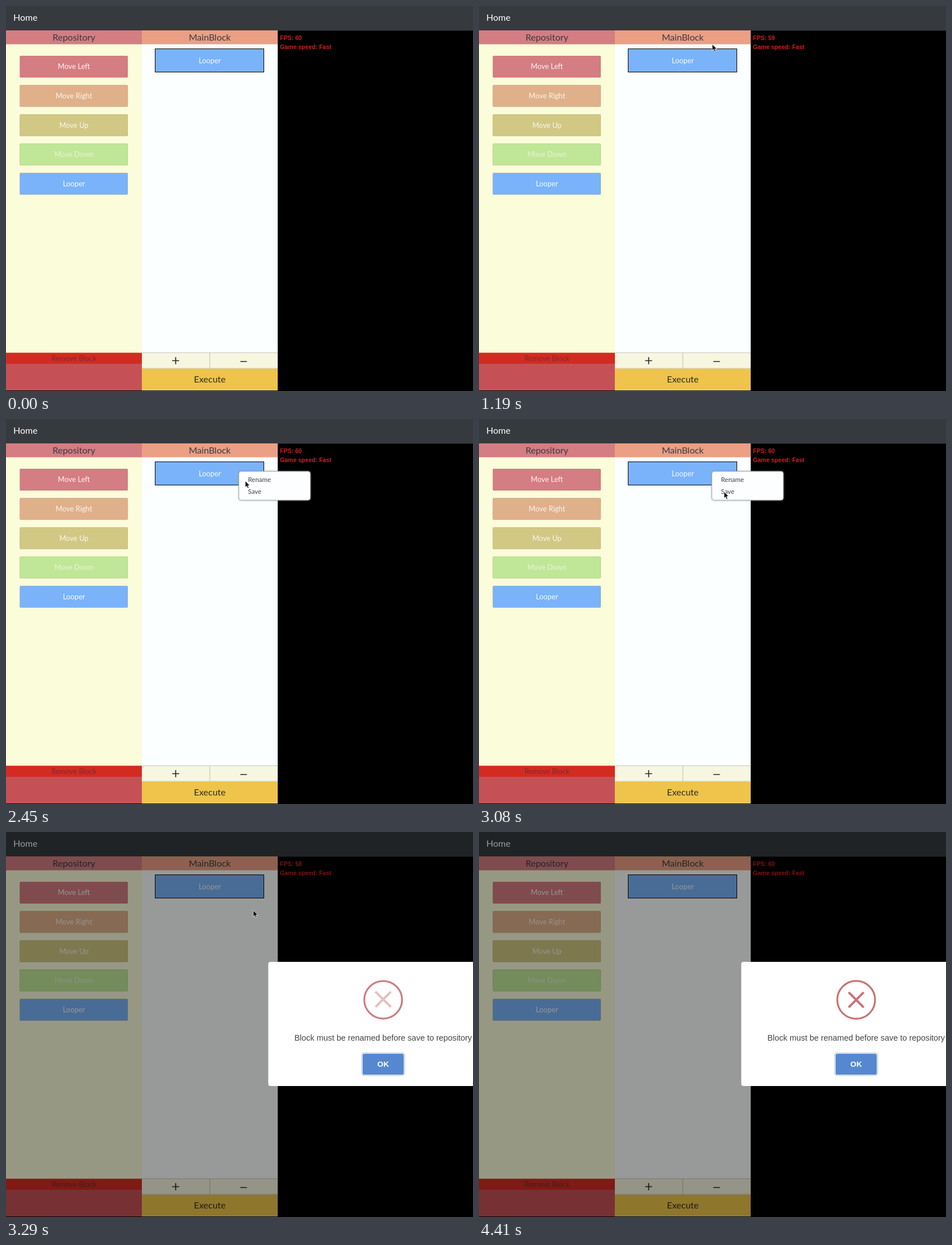
Recreate the animation shown at these times as an HTML page. Size 825x679 px, loop 4.48 s.

```html
<!DOCTYPE html>
<html lang="en">
<head>
<meta charset="utf-8">
<title>Block editor</title>
<style>
  html, body { margin: 0; width: 100%; height: 100%; overflow: hidden; background: #000; }
  svg { display: block; width: 825px; height: 679px; }
  text { font-family: Lato, sans-serif; font-size: 12.8px; }
  .mid { text-anchor: middle; }
  .head { font-size: 16px; fill: #393a42; }
  .menu text { font-size: 11.5px; fill: #3d3f44; }
  .hud { font: bold 10.55px "Liberation Sans", Arial, sans-serif; fill: #cf211d; }
  .msg { font: 14.4px "Liberation Sans", Arial, sans-serif; fill: #444; }
  .ok { font: bold 13.6px "Liberation Sans", Arial, sans-serif; fill: #fff; }
  .menu rect { filter: drop-shadow(0 0 1.5px #8c8c8c); }
</style>
</head>
<body>
<svg viewBox="0 0 825 679">
  <rect width="825" height="679"/>
  <rect width="825" height="43.5" fill="#363a3e"/>
  <text x="13" y="26.3" font-size="16" style="font-size:16px" fill="#fff">Home</text>

  <rect y="43" width="240" height="635" fill="#fbfcd9"/>
  <rect y="43" width="240" height="24.5" fill="#d47d82"/>
  <text class="mid head" x="120" y="60.5">Repository</text>
  <g id="blocks"></g>
  <rect y="611.5" width="240" height="20" fill="#d32b22"/>
  <rect y="631" width="240" height="47" fill="#c55157"/>
  <text class="mid" x="120" y="625.5" fill="#7f2a2a">Remove Block</text>

  <rect x="240" y="43" width="240" height="635" fill="#fcffff"/>
  <rect x="240" y="43" width="240" height="24.5" fill="#eb9f84"/>
  <text class="mid head" x="360" y="60.5">MainBlock</text>
  <rect x="263.5" y="75.5" width="192" height="41" fill="#7ab3f9" stroke="#000"/>
  <text class="mid" x="360" y="100.5" fill="#fff" fill-opacity=".93">Looper</text>
  <path d="M240 611.5h240v28H240z" fill="#f6f6e1"/>
  <path d="M240 611.5h240M240 639h240M360 612v27" stroke="#c6c7bd" stroke-width="1.2"/>
  <path d="M293.5 625.5h12.4M299.7 619.3v12.4M414 627h11.6" stroke="#26272c" stroke-width="1.7"/>
  <rect x="240" y="639.5" width="240" height="38" fill="#eec44a"/>
  <text class="mid" style="font-size:16px" x="360" y="663.5" fill="#2e2b22">Execute</text>

  <text class="hud" id="fps" x="484" y="59.7"></text>
  <text class="hud" x="484" y="75.6">Game speed: Fast</text>

  <g class="menu" id="menu">
    <rect x="411.5" y="92.5" width="126" height="50.5" rx="4" fill="#fdfeff" stroke="#b4b6b8"/>
    <text x="427.5" y="110.6">Rename</text>
    <text x="427.5" y="132.2">Save</text>
  </g>

  <g id="dialog">
    <rect width="825" height="679" fill-opacity=".4"/>
    <g id="popup">
      <rect x="-203" y="-109.5" width="406" height="219" rx="4" fill="#fff"/>
      <g id="icon">
        <circle r="33.4" fill="none" stroke="#c97177" stroke-width="3.2"/>
        <path id="cross" d="M-13.3-13.3 13.3 13.3M13.3-13.3-13.3 13.3" stroke="#c97177" stroke-width="4"/>
      </g>
      <text class="mid msg" y="29.5">Block must be renamed before save to repository</text>
      <rect x="-38.6" y="50.4" width="77.2" height="41.2" rx="5" fill="#adc1d5"/>
      <rect x="-37.6" y="51.4" width="75.2" height="39.2" rx="4" fill="#fff"/>
      <rect x="-36.4" y="52.4" width="72.8" height="37.2" rx="3.2" fill="#5588d0"/>
      <text class="mid ok" y="75.8">OK</text>
    </g>
  </g>

  <circle id="ring" cx="410.3" cy="89.7" r="24" fill="none" stroke="#62cf58" stroke-width="1.8"/>
  <g id="cursor">
    <path id="arrow" d="M0 0V11.2L2.6 8.8 4.3 12.9 6.3 12 4.6 8.1H8.2Z" stroke="#fff" stroke-width=".8"/>
    <path id="hand" fill="#fff" stroke="#000" stroke-linejoin="round"
      d="M-3 6.5C-3.5 4-6 2-6 .3-5.6-1-4.3-.6-3.3.8L-4.4-3.6C-4.4-5-3-5.2-2.5-3.8L-1.8-1.2-1.8-5C-1.5-6.4 0-6.4.2-5L.4-1.2 1.2-4.6C1.8-5.8 3-5.4 2.9-4.1L2.6-.8 3.8-2.9C4.6-3.8 5.6-3.2 5.3-2 4.8.6 4.6 3.5 3.4 6.5ZM-.8 2.2V4.8M1.5 2.2V4.8"/>
  </g>
</svg>
<script>
const LOOP = 4480, STEP = 70, MENU = 1890, ALERT = 3150, POP_START = 2960;
const $ = id => document.getElementById(id);

const blocks = [
  ['Move Left', '#d47d82', .92], ['Move Right', '#e0b08a', .85], ['Move Up', '#d1c884', .85],
  ['Move Down', '#c0e797', .6], ['Looper', '#7ab3f9', .95]
];
$('blocks').innerHTML = blocks.map(([name, color, alpha], i) => {
  const y = 88 + i * 51.6;
  return `<rect x="24.5" y="${y}" width="190.5" height="38" rx="1.5" fill="${color}" stroke="#000" stroke-opacity=".13"/>
    <text class="mid" x="120" y="${y + 23.3}" fill="#fff" fill-opacity="${alpha}">${name}</text>`;
}).join('');

// time, x, y of the pointer
const path = [
  [840, 436, -14], [1190, 412, 67.5], [1470, 410.3, 89.7], [2240, 410.3, 89.7],
  [2520, 425, 113], [2870, 433, 128.5], [3220, 433, 128.5], [3570, 469.5, 222], [4060, 663, 408]
];
const fps = [[0, 60], [1120, 59], [2310, 60], [3150, 58], [3780, 60]];

const lerp = (a, b, p) => a + (b - a) * p;
const clamp = p => Math.min(1, Math.max(0, p));
const smooth = p => p * p * (3 - 2 * p);

// cubic-bezier(.25, .1, .25, 1)
function ease(p) {
  const curve = (a, b, u) => 3 * a * u * (1 - u) ** 2 + 3 * b * u * u * (1 - u) + u ** 3;
  let lo = 0, hi = 1;
  for (let i = 0; i < 20; i++) {
    const u = (lo + hi) / 2;
    if (curve(.25, .25, u) < p) lo = u; else hi = u;
  }
  return curve(.1, 1, lo);
}

// interpolates rows of [position, ...values]
function track(rows, at, easing) {
  const i = rows.findIndex(row => row[0] > at);
  if (i === 0) return rows[0].slice(1);
  if (i < 0) return rows[rows.length - 1].slice(1);
  const a = rows[i - 1], b = rows[i];
  const p = easing((at - a[0]) / (b[0] - a[0]));
  return a.slice(1).map((v, k) => lerp(v, b[k + 1], p));
}

const show = (id, on) => { $(id).style.display = on ? '' : 'none'; };
const move = (id, value) => $(id).setAttribute('transform', value);

function draw(t) {
  const [x, y] = track(path, t, smooth);
  const overBlock = t < MENU + 350 && y > 75 && y < 117;
  show('cursor', t >= 840 && t < 4340);
  show('hand', overBlock);
  show('arrow', !overBlock);
  move('cursor', `translate(${x} ${y})`);

  show('ring', t >= 1820 && t < 2170);
  show('menu', t >= MENU && t < ALERT);
  show('dialog', t >= ALERT);
  $('fps').textContent = 'FPS: ' + fps.filter(row => row[0] <= t).pop()[1];

  const age = t - POP_START;
  const [scale] = track([[0, .7], [.45, 1.05], [.8, .95], [1, 1]], age / 300, ease);
  move('popup', `translate(666.3 338.5) scale(${scale})`);

  const turn = ease(clamp(age / 500));
  move('icon', `translate(0 -42.5) scale(1 ${Math.cos((1 - turn) * 100 * Math.PI / 180)})`);
  $('icon').setAttribute('opacity', turn);

  const [drop, size, alpha] = track(
    [[0, 20, .4, 0], [.5, 20, .4, 0], [.8, -5, 1.15, .6], [1, 0, 1, 1]], age / 500, ease);
  move('cross', `translate(0 ${drop}) scale(${size})`);
  $('cross').setAttribute('opacity', alpha);
}

const start = performance.now();
function tick() {
  const t = (performance.now() - start) % LOOP;
  draw(Math.floor(t / STEP) * STEP);
  requestAnimationFrame(tick);
}
tick();
</script>
</body>
</html>
```
